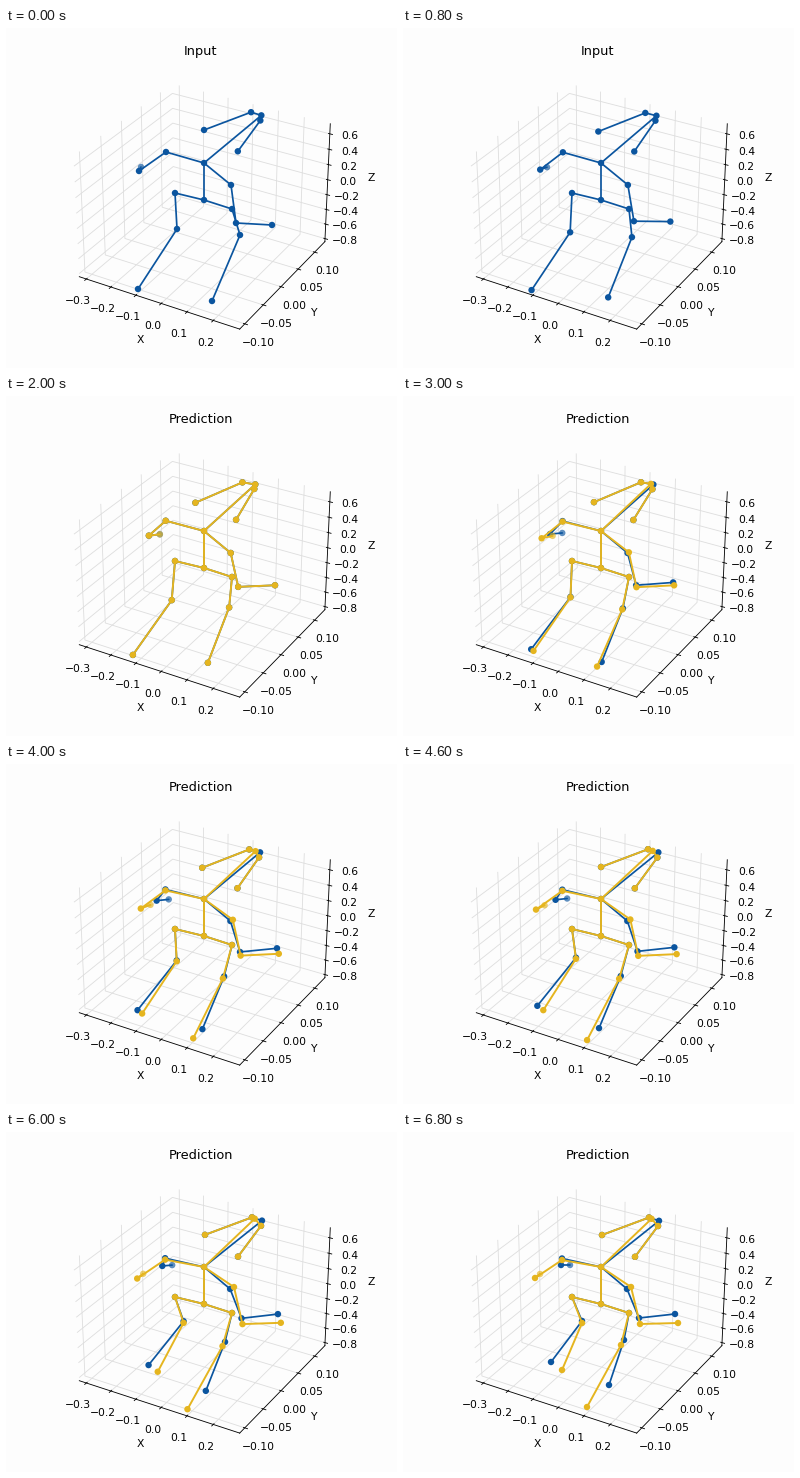
These frames come from a looping animation (391 by 340 pixels, 7000 ms). A matplotlib script:

```python
import numpy as np
import matplotlib.pyplot as plt
from matplotlib.animation import FuncAnimation
from matplotlib.collections import LineCollection
from matplotlib.colors import to_rgba

W, H, DPI = 391, 340, 77.25
FRAMES, STEP_MS, INPUT_FRAMES = 35, 200, 10
BLUE, GOLD, PAPER = "#0b559f", "#e5b51f", "#fdfdfd"

plt.rcParams.update({"font.family": "DejaVu Sans", "grid.color": "#dedede"})
fig = plt.figure(figsize=((W + 0.01) / DPI, (H + 0.01) / DPI), dpi=DPI, facecolor=PAPER)


# ---- Box with axes ----

SIDE, LEFT, BOTTOM = 285.5, 51.75, 20.9
box = fig.add_axes([LEFT / W, BOTTOM / H, SIDE / W, SIDE / H],
                   projection="3d", facecolor="none")
box.set(xlim=(-0.329, 0.299), ylim=(-0.1135, 0.132), zlim=(-0.842, 0.729),
        xlabel="X", ylabel="Y", zlabel="Z",
        xticks=np.arange(-3, 3) / 10,
        yticks=np.arange(-2, 3) / 20,
        zticks=np.arange(-4, 4) / 5)
for side in (box.xaxis, box.yaxis, box.zaxis):
    side.set_pane_color((1, 1, 1, 0))
title = box.set_title("Input")

# Flat layer in stage pixels, y pointing down
stage = fig.add_axes([0, 0, 1, 1], zorder=2)
stage.set(xlim=(0, W), ylim=(H, 0))
stage.axis("off")


# ---- Motion ----

frame = np.arange(FRAMES)
loop = frame / (FRAMES - 1)
future = np.clip((frame - INPUT_FRAMES) / (FRAMES - 1 - INPUT_FRAMES), 0, 1)
sway = np.exp(-((frame - 11.5) / 7.5) ** 2)


def through(*points):
    """Polynomial path through points spread evenly over the loop."""
    keys = np.linspace(0, 1, len(points))
    coef = np.polyfit(keys, np.array(points, float), len(points) - 1)
    return np.vander(loop, len(points)) @ coef


def along(vector, amount):
    return np.outer(amount, vector)


def head(x, y, dx, dy):
    """Head point that swings by (dx, dy) and nods slowly downwards."""
    return through((x, y), (x, y + 1.5)) + along((dx, dy), sway)


truth = {
    "root": through((198, 172)),
    "neck": through((198, 135)),
    "hip_l": through((169, 165)),
    "knee_l": through((171, 201), (166, 203.5), (172.7, 194), (179, 189)),
    "foot_l": through((132, 261), (127, 257.6), (134, 242.3), (148, 230)),
    "hip_r": through((226, 181)),
    "knee_r": through((234, 207), (219, 212.5), (221, 208)),
    "foot_r": through((206, 273), (201, 266.5), (196, 264.3), (206, 253)),
    "shoulder_l": through((160, 124), (159, 126.5)),
    "elbow_l": through((133, 143), (148.5, 137.5), (158, 133)),
    "hand_l": through((135, 139), (155.5, 138), (164, 134.6), (167, 133)),
    "shoulder_r": through((225, 157), (224, 157)),
    "elbow_r": through((230, 195), (233.5, 188.7), (236, 186)),
    "hand_r": through((266, 197), (270.5, 185.5), (272, 182)),
    "nose": head(256, 87.3, -7, 0.7),
    "eye_l": head(246, 84, -10, 2),
    "ear_l": head(199, 101.5, -10, 5),
    "eye_r": head(255, 92.5, -7, 0),
    "ear_r": head(232, 123.3, -2, 0),
}

# The forecast drifts off the truth: legs steadily, the upper body easing out
leg_drift = {"knee_l": (0, 2), "foot_l": (11, 8), "knee_r": (-3, 5), "foot_r": (-22, 22)}
body_drift = {"shoulder_l": (0, 1.5), "elbow_l": (-26, 13), "hand_l": (-30, 9),
              "shoulder_r": (4, -2), "elbow_r": (1, 6), "hand_r": (3, 9),
              "nose": (-7.5, -2)}
guess = dict(truth)
for drift, amount in ((leg_drift, future), (body_drift, np.sin(future * np.pi / 2))):
    for joint, vector in drift.items():
        guess[joint] = truth[joint] + along(vector, amount)


# ---- Skeletons ----

CHAINS = [
    "root hip_l knee_l foot_l",
    "root hip_r knee_r foot_r",
    "root neck nose",
    "neck shoulder_l elbow_l hand_l",
    "neck shoulder_r elbow_r hand_r",
    "nose eye_l ear_l",
    "nose eye_r ear_r",
]


class Skeleton:
    def __init__(self, motion, color, width, z):
        self.motion = motion
        self.bones = LineCollection([], colors=color, linewidths=width,
                                    capstyle="round", zorder=z)
        stage.add_collection(self.bones, autolim=False)
        shades = [to_rgba(color, 0.65 if j == "hand_l" else 1) for j in motion]
        origin = np.zeros(len(motion))
        self.dots = stage.scatter(origin, origin, s=36, c=shades,
                                  linewidths=0, zorder=z + 1)

    def pose(self, i):
        self.bones.set_segments([[self.motion[j][i] for j in chain.split()]
                                 for chain in CHAINS])
        self.dots.set_offsets([path[i] for path in self.motion.values()])

    def show(self, on):
        self.bones.set_visible(on)
        self.dots.set_visible(on)


actual = Skeleton(truth, BLUE, 1.6, 1)
predicted = Skeleton(guess, GOLD, 1.8, 3)


def update(i):
    predicting = i >= INPUT_FRAMES
    title.set_text("Prediction" if predicting else "Input")
    actual.pose(i)
    predicted.pose(i)
    predicted.show(predicting)
    return []


anim = FuncAnimation(fig, update, frames=FRAMES, interval=STEP_MS, repeat=True)
plt.show()
```
